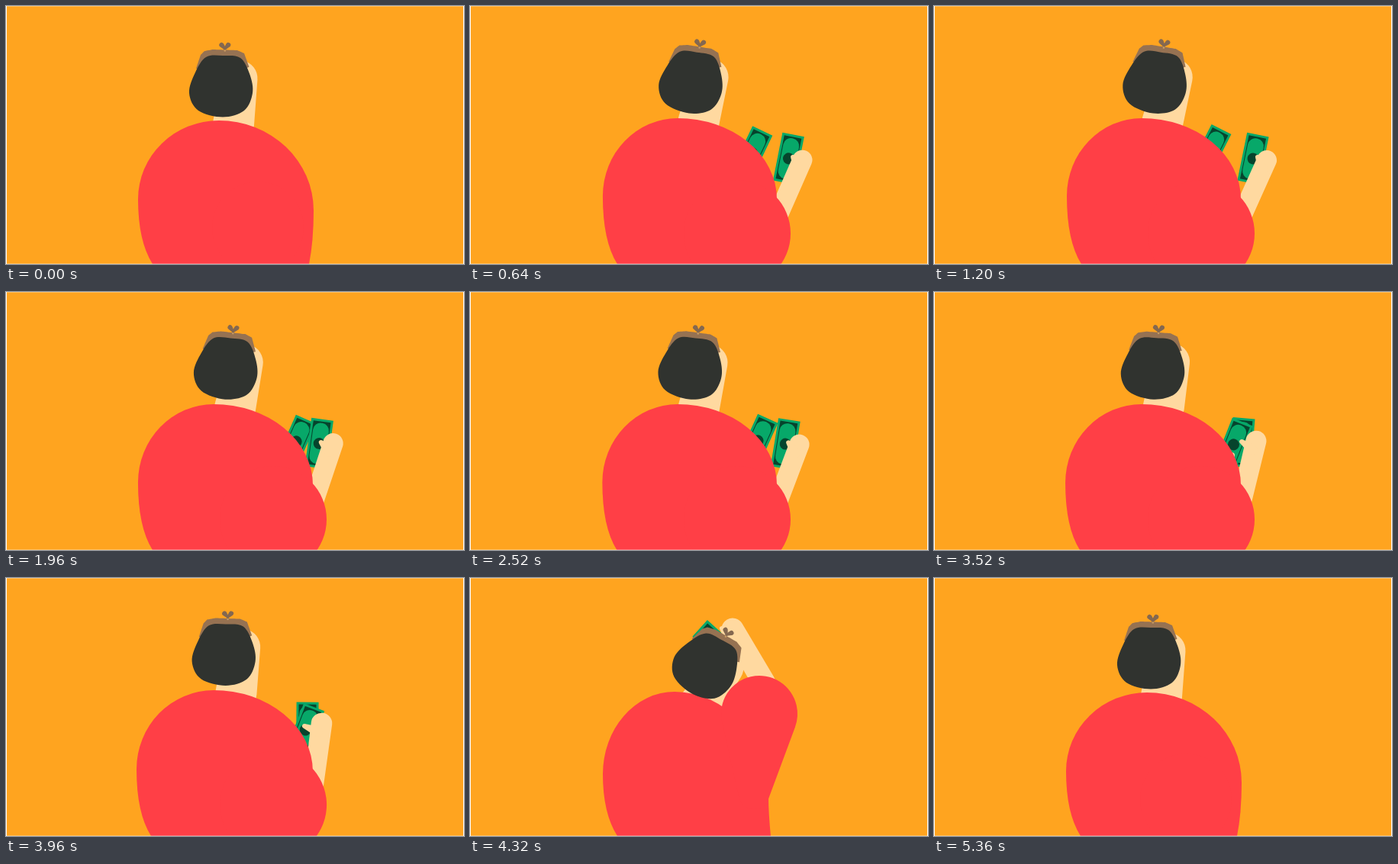
An HTML page with a canvas that plays this animation: 600 px wide and 338 px high, repeating every 5.88 s.

```html
<!DOCTYPE html>
<html lang="en">
<head>
<meta charset="utf-8">
<title>Purse head</title>
<style>
  html, body { margin: 0; width: 100%; height: 100%; overflow: hidden; background: #ffa41f; }
  canvas { display: block; width: 600px; height: 338px; }
</style>
</head>
<body>
<canvas id="stage" width="600" height="338"></canvas>
<script>
const ctx = document.getElementById('stage').getContext('2d');
const W = 600, H = 338, LOOP = 5880, STEP = 40, CYCLE = 600;
const C = {
  bg: '#ffa41f', red: '#ff3f46', skin: '#ffd9a0', black: '#30332f',
  brown: '#967252', knob: '#846850', gold: '#c79a62', green: '#07a869', dark: '#06442d'
};

// body: left, crown x, crown y, left widest y, right, right widest y, right foot x
// sleeve, arm: limb of two circles (x, y, r); thumb: tip relative to the hand
// bills, head: x, y, degrees
const rest = {
  body: [173, 279, 150, 253, 403, 268, 397],
  sleeve: [330, 290, 60, 330, 290, 30],
  arm: [360, 262, 13, 350, 300, 13], thumb: [-12, -4],
  right: [343, 260, 11], left: [320, 250, 27], head: [0, 0, 0]
};
const open = {
  body: [174, 272, 147, 249, 402, 253, 400],
  sleeve: [350, 298, 70, 350, 298, 30],
  arm: [436, 202, 13, 405, 271, 13], thumb: [-12, -4],
  right: [418, 200, 11.5], left: [362, 190, 27], head: [8, -5, 7.5]
};
const shut = {
  ...open,
  body: [172, 272, 147, 250, 402, 253, 400],
  arm: [421.5, 195, 13.5, 404, 270, 13], thumb: [-19, 1],
  right: [403, 197, 4.5], left: [396, 201, 21], head: [5, -4.8, 2.5]
};
const up = {
  body: [174, 268, 149, 257, 391, 287, 394],
  sleeve: [379, 178, 50, 372, 283, 20],
  arm: [344, 67, 14.5, 385, 137, 15], thumb: [-14, -1],
  right: [325, 87.5, -48], left: [325, 87.5, -48], head: [26.5, 10, 28]
};

const span = (t, a, b) => Math.min(1, Math.max(0, (t - a) / (b - a)));
const smooth = x => x * x * (3 - 2 * x);
const easeOut = x => 1 - (1 - x) ** 3;
const mix = (a, b, k) => a.map((v, i) => v + (b[i] - v) * k);
const rad = deg => deg * Math.PI / 180;

function blend(p, q, k) {
  const out = {};
  for (const part in p) out[part] = mix(p[part], q[part], k);
  return out;
}

// The hands close slowly, then flick apart.
function counting(t) {
  const ph = t % CYCLE;
  const spread = 1 - 1.6 * (smooth(span(ph, 0, 420)) - smooth(span(ph, 460, 600)));
  const pull = 1 - span(ph, 0, 420) ** .65 + smooth(span(ph, 500, 600));
  const p = blend(shut, open, spread);
  p.left = mix(shut.left, open.left, pull);
  return p;
}

function poseAt(t) {
  if (t < 400 || t >= 5360) return rest;
  if (t < 3960) return blend(rest, counting(t), easeOut(span(t, 360, 600)));
  if (t <= 4320) {
    const k = smooth(span(t, 3940, 4320));
    const p = blend(counting(3960), up, k);
    const lift = 52 * Math.sin(Math.PI * k * k);
    for (const part of [p.arm, p.right, p.left]) part[1] -= lift;
    return p;
  }
  const p = blend(up, rest, smooth(span(t, 4420, 4960)));
  p.head = mix(up.head, rest.head, easeOut(smooth(span(t, 4420, 5360))));
  p.right = p.left = mix(up.right, [308, 117, -48], smooth(span(t, 4320, 4440)));
  return p;
}

function fill(color) {
  ctx.fillStyle = color;
  ctx.fill();
}

function dot(x, y, r, color) {
  ctx.beginPath();
  ctx.arc(x, y, r, 0, Math.PI * 2);
  fill(color);
}

// Hull of two circles.
function limb([x0, y0, r0, x1, y1, r1], color) {
  const a = Math.atan2(y1 - y0, x1 - x0);
  const cos = (r0 - r1) / Math.hypot(x1 - x0, y1 - y0);
  const b = Math.acos(Math.max(-1, Math.min(1, cos)));
  ctx.beginPath();
  ctx.arc(x0, y0, r0, a + b, a - b + Math.PI * 2);
  ctx.arc(x1, y1, r1, a - b, a + b);
  fill(color);
}

// Closed curve through points; bend 0 gives straight sides.
function loop(pts, bend, color) {
  const n = pts.length, at = i => pts[(i + n) % n];
  ctx.beginPath();
  ctx.moveTo(...pts[0]);
  for (let i = 0; i < n; i++) {
    const [a, b, c, d] = [at(i - 1), at(i), at(i + 1), at(i + 2)];
    const c1 = b.map((v, j) => v + (c[j] - a[j]) * bend);
    const c2 = c.map((v, j) => v - (d[j] - b[j]) * bend);
    ctx.bezierCurveTo(...c1, ...c2, ...c);
  }
  fill(color);
}

function body([l, cx, top, yl, r, yr, foot]) {
  const { PI } = Math;
  ctx.beginPath();
  ctx.moveTo(l + 19, H);
  ctx.quadraticCurveTo(l, 308, l, yl);
  ctx.ellipse(cx, yl, cx - l, yl - top, 0, PI, 1.5 * PI);
  ctx.ellipse(cx, yr, r - cx, yr - top, 0, 1.5 * PI, 2 * PI);
  ctx.quadraticCurveTo(r, 308, foot, H);
  fill(C.red);
}

function bill([x, y, deg]) {
  ctx.save();
  ctx.translate(x, y);
  ctx.rotate(rad(deg));
  ctx.fillStyle = C.green;
  ctx.fillRect(-14.5, -32, 29, 64);
  ctx.fillStyle = C.dark;
  ctx.fillRect(-11.5, -29, 23, 58);
  ctx.beginPath();
  ctx.roundRect(-10.5, -27, 21, 54, 10);
  fill(C.green);
  dot(0, 0, 7.5, C.dark);
  ctx.restore();
}

function inHead([dx, dy, deg], draw) {
  ctx.save();
  ctx.translate(281.5 + dx, 106 + dy);
  ctx.rotate(rad(deg));
  ctx.translate(-281.5, -106);
  draw();
  ctx.restore();
}

function face() {
  limb([305.5, 95, 24, 298, 155, 27], C.skin);
}

function purse() {
  for (const side of [-1, 1]) {
    limb([286.8 + 4.4 * side, 51, 3.1, 286.8, 56, 1.4], C.knob);
  }
  limb([286.8, 55, 1.4, 286.8, 60, 1.4], C.knob);
  loop([[249, 82], [255, 64], [260, 59], [271, 57], [303, 58], [312, 62], [318.5, 80], [284, 90]], 0, C.brown);
  dot(286.8, 58.5, 1.3, C.gold);
  loop([[262, 67], [284, 65], [307, 68], [319.5, 90], [323, 114], [312, 137],
        [284, 145.5], [252, 137], [240, 114], [248, 87]], 1 / 6, C.black);
}

function hand([x, y], [tx, ty]) {
  limb([x - 5, y + 11, 6.5, x + tx, y + ty, 3], C.skin);
}

function draw(t) {
  const p = poseAt(t);
  ctx.fillStyle = C.bg;
  ctx.fillRect(0, 0, W, H);
  inHead(p.head, face);
  if (t >= 400 && t < 4960) {
    if (t < 4460) {
      const leftOnTop = t % CYCLE > CYCLE / 2;
      (leftOnTop ? [p.right, p.left] : [p.left, p.right]).forEach(bill);
      if (t < 3960) dot(p.left[0] - 2, p.left[1] + 14, 3.5, C.skin);
    }
    limb(p.arm, C.skin);
    hand(p.arm, p.thumb);
  }
  body(p.body);
  limb(p.sleeve, C.red);
  inHead(p.head, purse);
  ctx.fillStyle = '#fff';
  ctx.fillRect(0, 0, 1, H);
  ctx.fillRect(W - 1, 0, 1, H);
  ctx.fillStyle = 'rgba(255, 255, 255, .3)';
  ctx.fillRect(0, 0, W, 1);
  ctx.fillRect(0, H - 1, W, 1);
}

const start = performance.now();
function frame() {
  const t = (performance.now() - start) % LOOP;
  draw(Math.floor(t / STEP) * STEP);
  requestAnimationFrame(frame);
}
frame();
</script>
</body>
</html>
```
